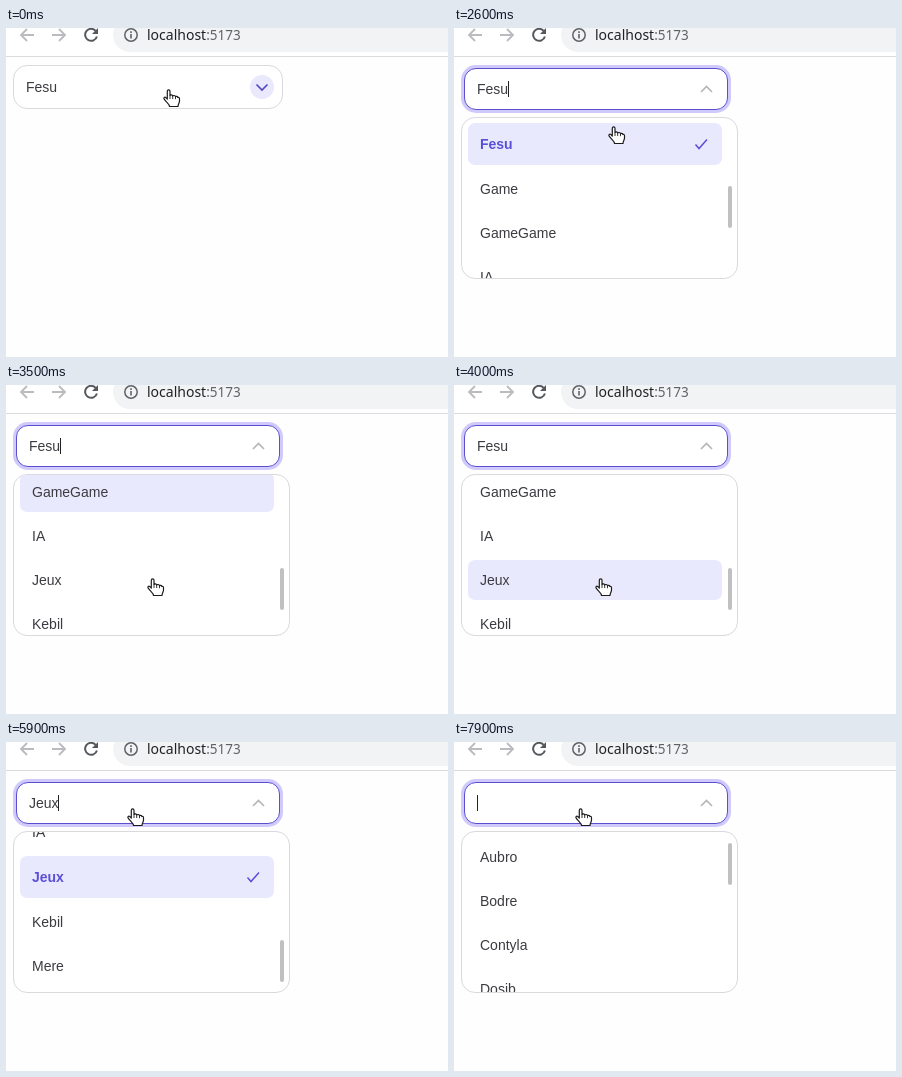
An HTML page that plays this animation: 442 by 329 pixels, repeating every 8 s.

```html
<!DOCTYPE html>
<html lang="en">
<head>
<meta charset="utf-8">
<title>Searchable select</title>
<style>
  html, body { margin: 0; width: 100%; height: 100%; overflow: hidden; background: #fefefe; }
  body { position: relative; font: 14px "Liberation Sans", Arial, sans-serif; color: #3b3b41; }
  div, svg { position: absolute; box-sizing: border-box; }
  svg { left: 0; top: 0; overflow: visible; fill: none; }
  .bar { left: 0; top: 0; width: 442px; height: 29px; background: #fff; border-bottom: 1px solid #dadce0; overflow: hidden; }
  .address { left: 107px; top: -10px; width: 400px; height: 34px; border-radius: 17px; background: #f1f3f4; }
  .url { left: 141px; top: -3px; line-height: 20px; font-family: "Noto Sans", "Open Sans", sans-serif; color: #202124; white-space: nowrap; }
  .url span { font-size: 13.5px; color: #5f6368; }
  .box { left: 7px; top: 37px; width: 270px; height: 44px; border: 1px solid #d9d9de; border-radius: 14px; padding-left: 12px; line-height: 42px; background: #fff; }
  .open .box { left: 10px; top: 40px; width: 264px; height: 42px; border-color: #5a4fcf; border-radius: 12px; line-height: 40px; box-shadow: 0 0 0 3px #cfcafb; }
  .caret { top: 53px; width: 1px; height: 16px; background: #222; }
  .panel { left: 7px; top: 89px; width: 277px; height: 162px; border: 1px solid #d9d9de; border-radius: 14px; background: #fff; overflow: hidden; }
  .list { left: 6px; top: 5px; width: 254px; display: flex; flex-direction: column; gap: 4px; }
  .row { position: relative; flex: none; height: 40px; line-height: 40px; padding-left: 12px; border-radius: 7px; }
  .row svg { display: none; }
  .hover, .chosen { background: #e9e9fe; }
  .chosen { height: 42px; line-height: 42px; font-weight: bold; color: #5b4fd6; }
  .chosen svg { display: block; }
  .thumb { left: 266px; width: 4px; height: 42px; border-radius: 2px; background: #c0c0c0; }
  .panel, .up, .open .down { display: none; }
  .open .panel, .open .up { display: block; }
</style>
</head>
<body>
<div class="bar">
  <div class="address"></div>
  <svg width="442" height="29" stroke-width="1.8">
    <path d="M28 7H15.5M21 1 15 7 21 13M46 7H58.500M53 1 59 7 53 13" stroke="#b9bbbe"/>
    <path d="M89.600 2.800A6 6 0 1 0 90.900 8.500" stroke="#55595e" stroke-width="2"/>
    <path d="M92 0V6H86Z" fill="#55595e"/>
    <circle cx="125" cy="7" r="6.200" stroke="#5f6368" stroke-width="1.500"/>
    <path d="M125 6V10.500M125 3.300V4.900" stroke="#5f6368" stroke-width="1.600"/>
  </svg>
  <div class="url">localhost<span>:5173</span></div>
</div>

<div id="select">
  <div class="box"><span id="value"></span></div>
  <svg class="down" width="442" height="329">
    <circle cx="256" cy="59" r="12" fill="#e9e8fd"/>
    <path d="M250.500 56.500 256 62 261.500 56.500" stroke="#5549c0" stroke-width="1.700"/>
  </svg>
  <svg class="up" width="442" height="329">
    <path d="M247 64 252.500 58.500 258 64" stroke="#b5b5b8" stroke-width="1.600"/>
  </svg>
  <div class="caret" id="caret"></div>
  <div class="panel">
    <div class="list" id="list"></div>
    <div class="thumb" id="thumb"></div>
  </div>
</div>

<svg id="hand" width="18" height="19">
  <path d="M4.300 10V2.200C4.300.4 7 .4 7 2.200V6.500C7.300 5.500 9.500 5.600 9.700 7 10.200 6.200 12.200 6.300 12.500 7.700 13 7 14.600 7.300 14.800 8.500 15.500 8 16.500 8.500 16.500 9.800V12C16.500 14 15 15 15 17.500H6.500C6.500 15 3.500 13.500 1.200 10.200.2 8.700 1.700 7.600 2.900 8.600Z"
    fill="#fff" stroke="#1b1b1b" stroke-width="1.200" stroke-linejoin="round"/>
  <path d="M7 6.500V10M9.700 7V10M12.500 7.700V10.200" stroke="#1b1b1b" stroke-width=".9"/>
</svg>

<script>
const LOOP = 8000, TEXT_LEFT = 23;
const names = ["Aubro", "Bodre", "Contyla", "Dosib", "Emro", "Fesu", "Game", "GameGame", "IA", "Jeux", "Kebil", "Mere"];
const start = { open: false, value: "Fesu", chosen: "Fesu", hover: "", caret: false, scroll: 0, x: 157, y: 61 };

// Each entry changes part of the state from its time on.
const steps = [
  [1100, { open: true, caret: true, scroll: 220 }],
  [1600, { caret: false }],
  [2200, { caret: true }],
  [2600, { x: 154, y: 98, hover: "Fesu" }],
  [2700, { caret: false, x: 147, y: 148, hover: "Game" }],
  [2800, { x: 142, y: 185, hover: "GameGame" }],
  [2900, { x: 141, y: 193 }],
  [3300, { caret: true, scroll: 250 }],
  [3400, { scroll: 296 }],
  [3500, { scroll: 318 }],
  [3900, { caret: false }],
  [4000, { hover: "Jeux" }],
  [4400, { open: false, value: "Jeux", chosen: "Jeux", hover: "" }],
  [4600, { x: 139, y: 196 }],
  [4700, { x: 135, y: 166 }],
  [4800, { x: 128, y: 116 }],
  [4900, { x: 122, y: 78 }],
  [5000, { x: 121, y: 66 }],
  [5900, { open: true, caret: true, scroll: 377 }],
  [6100, { caret: false }],
  [6400, { value: "Jeu" }],
  [6700, { caret: true }],
  [6800, { value: "Je" }],
  [7100, { value: "J" }],
  [7300, { value: "", chosen: "", caret: false, scroll: 0 }],
  [7900, { caret: true }]
];

const $ = id => document.getElementById(id);
const ui = Object.fromEntries(["select", "value", "caret", "list", "thumb", "hand"].map(id => [id, $(id)]));
const tick = '<svg width="254" height="42"><path d="M227.500 21.500 231 25.500 239 16.500" stroke="#5b4fd6" stroke-width="1.500"/></svg>';
const rows = names.map(name => {
  const row = document.createElement("div");
  row.innerHTML = name + tick;
  ui.list.append(row);
  return row;
});
const pen = document.createElement("canvas").getContext("2d");
pen.font = '14px "Liberation Sans", Arial, sans-serif';

function render(time) {
  const s = Object.assign({}, start, ...steps.filter(([at]) => at <= time).map(([, change]) => change));
  ui.select.className = s.open ? "open" : "";
  ui.value.textContent = s.value;
  ui.caret.style.display = s.open && s.caret ? "block" : "none";
  ui.caret.style.left = Math.floor(TEXT_LEFT + pen.measureText(s.value).width) + "px";
  rows.forEach((row, i) => {
    row.className = "row" + (names[i] === s.chosen ? " chosen" : names[i] === s.hover ? " hover" : "");
  });
  ui.list.style.top = 5 - s.scroll + "px";
  ui.thumb.style.top = Math.round(11 + s.scroll * 0.257) + "px";
  ui.hand.style.transform = `translate(${s.x}px, ${s.y}px)`;
}

const origin = performance.now();
function frame() {
  render((performance.now() - origin) % LOOP);
  requestAnimationFrame(frame);
}
frame();
</script>
</body>
</html>
```
